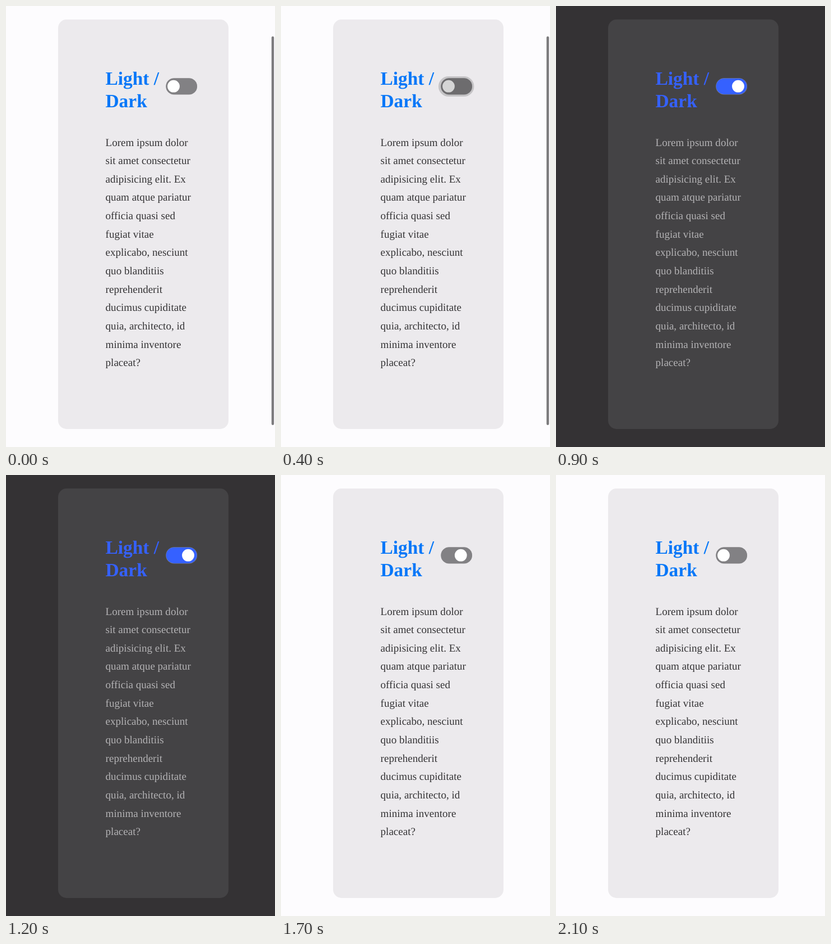
Animation of 480 by 784 pixels, one loop 2200 ms. Source, as an HTML page:

```html
<!DOCTYPE html>
<html lang="en">
<head>
<meta charset="utf-8">
<title>Light / Dark</title>
<style>
  html, body { margin: 0; width: 100%; height: 100%; overflow: hidden; }
  svg {
    display: block; width: 480px; height: 784px;
    --page: #fdfcfe; --card: #eceaed; --title: #0577f8; --text: #353436; --pill: #828184;
    background: var(--page);
  }
  svg.dark { --page: #343234; --card: #444345; --title: #3561ff; --text: #b3b2b4; --pill: #3561ff; }
  text { font-family: "Liberation Serif", "Times New Roman", serif; text-rendering: geometricPrecision; }
  #title { font-size: 33.4px; font-weight: bold; fill: var(--title); }
  #copy { font-size: 19.05px; fill: var(--text); }
</style>
</head>
<body>
<svg id="stage" viewBox="0 0 480 784">
  <rect x="93" y="24" width="304" height="728" rx="15" fill="var(--card)"/>
  <g id="title">
    <text x="177.5" y="140.2">Light /</text>
    <text x="177.5" y="179.8">Dark</text>
  </g>
  <g id="copy"></g>
  <rect x="285.3" y="128.3" width="55.8" height="29.2" rx="14.6" fill="#828184"/>
  <rect x="285.8" y="128.7" width="54.8" height="28.2" rx="14.1" fill="var(--pill)"/>
  <circle id="knob" cy="142.7" r="10.9" fill="#fff"/>
  <rect id="press" x="281" y="125" width="63.5" height="36" rx="18" fill="#000" opacity=".165"/>
  <rect id="scrollbar" x="473.8" y="54" width="4.4" height="691" rx="2.2" fill="#7c7b7d"/>
</svg>
<script>
const LOOP = 2200, STEP = 100, SLIDE = 400;
const TO_DARK = 445, TO_LIGHT = 1645;
const OFF_X = 299, ON_X = 325;
const $ = id => document.getElementById(id);

const lines = `Lorem ipsum dolor
sit amet consectetur
adipisicing elit. Ex
quam atque pariatur
officia quasi sed
fugiat vitae
explicabo, nesciunt
quo blanditiis
reprehenderit
ducimus cupiditate
quia, architecto, id
minima inventore
placeat?`.split("\n");
$("copy").innerHTML = lines
  .map((line, i) => `<text x="177.6" y="${248.5 + 32.65 * i}">${line}</text>`)
  .join("");

// CSS "ease": cubic-bezier(.25, .1, .25, 1), solved by bisection
function ease(x) {
  if (x <= 0) return 0;
  if (x >= 1) return 1;
  const bezier = (a, b, u) => 3 * a * u * (1 - u) ** 2 + 3 * b * u * u * (1 - u) + u ** 3;
  let low = 0, high = 1;
  for (let i = 0; i < 20; i++) {
    const mid = (low + high) / 2;
    if (bezier(.25, .25, mid) < x) low = mid; else high = mid;
  }
  return bezier(.1, 1, low);
}

const show = (id, on) => $(id).setAttribute("visibility", on ? "visible" : "hidden");

function draw(now) {
  const t = Math.floor(now % LOOP / STEP) * STEP;
  const slide = ease((t - TO_DARK) / SLIDE) - ease((t - TO_LIGHT) / SLIDE);
  $("stage").classList.toggle("dark", t >= TO_DARK && t < TO_LIGHT);
  $("knob").setAttribute("cx", OFF_X + (ON_X - OFF_X) * slide);
  show("press", t === 400);
  show("scrollbar", t < TO_DARK);
}

const start = performance.now();
function tick() {
  draw(performance.now() - start);
  requestAnimationFrame(tick);
}
tick();
</script>
</body>
</html>
```
